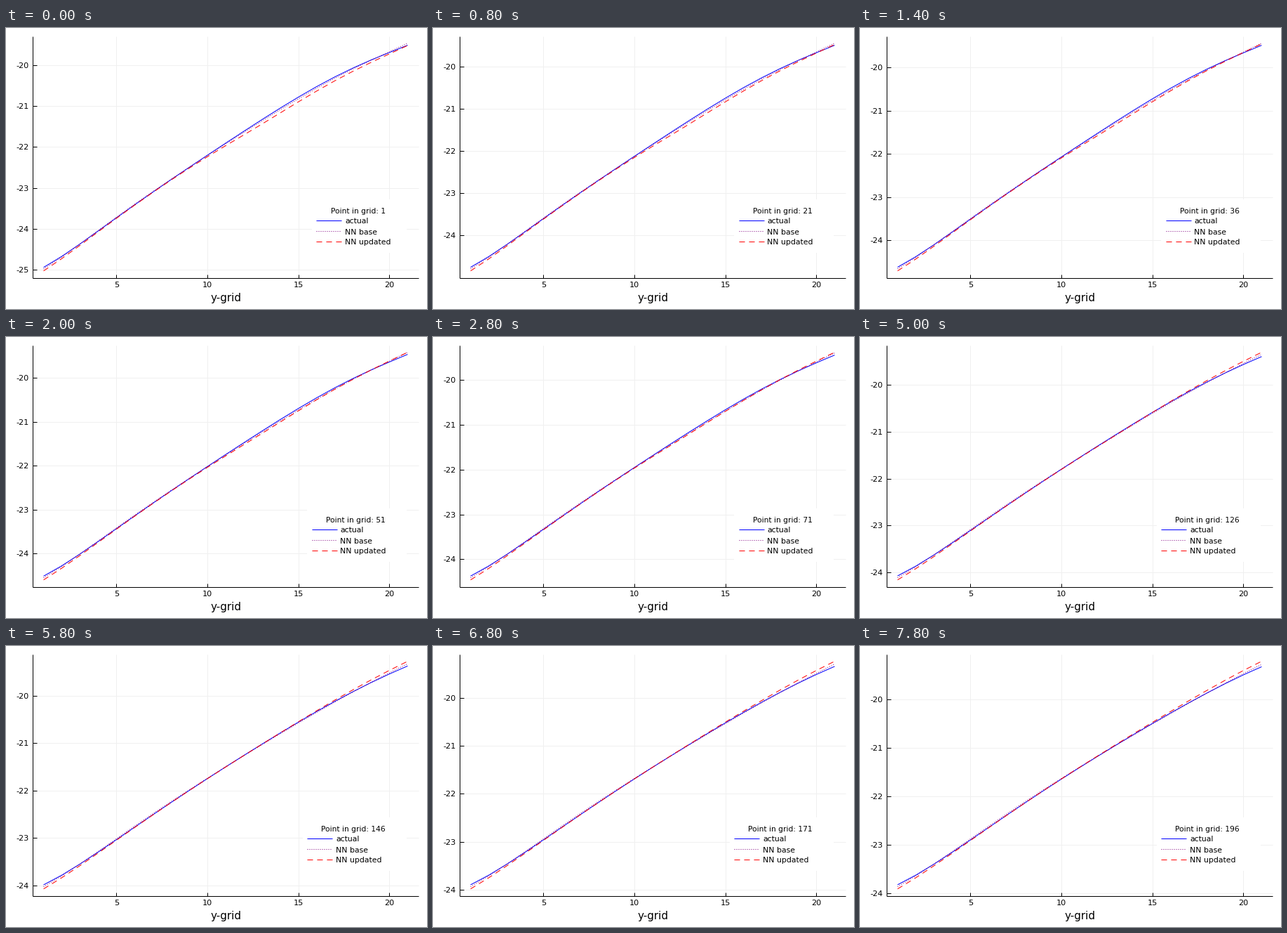
A matplotlib script for the animation above (8 s loop, 600x400 px).

```python
import numpy as np
import matplotlib.pyplot as plt
from matplotlib.animation import FuncAnimation
from matplotlib.patches import Rectangle
from numpy.polynomial.polynomial import polyval

W, H, DPI = 600, 400, 100
FRAMES, INTERVAL = 40, 200
LEFT, RIGHT, TOP, BOTTOM = 38, 588, 12, 355.5
PX = 72 / DPI
GRID = "#f0f0f0"
DASHED, DOTTED = (0, (8, 6)), (0, (1, 2))

X = np.arange(1, 22)
U = (X - 11) / 10  # grid mapped to -1..1

# Polynomial coefficients in U of the first and last "actual" curve
FIRST = [-21.908, 2.92, -0.14, -0.12, -0.52, -0.09, 0.34]
LAST = [-21.400, 2.36, -0.23, 0.06, 0.00, -0.17, 0.06]


def ease(p, rate):
    """Exponential approach from 0 to 1."""
    return np.expm1(-rate * p) / np.expm1(-rate)


def curves(p):
    # The left end settles early, the right end moves almost evenly.
    s = ease(p, 0.62 - 0.6 * U)
    actual = (1 - s) * polyval(U, FIRST) + s * polyval(U, LAST)

    wave = 0.13 * (U + 0.8) * (U + 0.2) * (U - 0.83)
    base = actual + wave + 0.025 * p * (1 - U ** 2) * (1 + U)

    ends = 0.113 * ((1 + U) / 2) ** 4.5 - 0.086 * ((1 - U) / 2) ** 9
    sag = (0.165 - 0.045 * U) / (1 + np.exp(-8 * (U - 0.05)))
    updated = actual + ends - sag * (1 - ease(p, 1.9))
    return actual, base, updated


def x_px(x):
    return LEFT + (x - 0.4) / 21.2 * (RIGHT - LEFT)


fig = plt.figure(figsize=(W / DPI, H / DPI), dpi=DPI, facecolor="white")
ax = fig.add_axes([0, 0, 1, 1])
ax.set_xlim(0, W)
ax.set_ylim(H, 0)
ax.axis("off")


def stroke(xs, ys, color="black", style="-", z=2):
    return ax.plot(xs, ys, color=color, lw=PX, ls=style, zorder=z,
                   solid_capstyle="butt", dash_capstyle="butt")[0]


def label(x, y, text, size, ha="left"):
    return ax.text(x, y, text, fontsize=size * PX, family="DejaVu Sans",
                   ha=ha, va="baseline", color="black", zorder=6)


# Fixed axes
stroke([LEFT, LEFT], [TOP, BOTTOM], z=4)
stroke([LEFT, RIGHT], [BOTTOM, BOTTOM], z=4)
for x in (5, 10, 15, 20):
    p = x_px(x)
    stroke([p, p], [TOP, BOTTOM], GRID, z=1)
    stroke([p, p], [BOTTOM - 5, BOTTOM], z=4)
    label(p, 369, str(x), 11.3, "center")
label(313.5, 388.7, "y-grid", 15.1, "center")

y_ticks = [(v, stroke([LEFT, RIGHT], [0, 0], GRID, z=1),
            stroke([LEFT, LEFT + 6], [0, 0], z=4),
            label(32.5, 0, str(v), 11.3, "right"))
           for v in range(-26, -18)]

STYLES = [("actual", "blue", "-"),
          ("NN base", "purple", DOTTED),
          ("NN updated", "red", DASHED)]
lines = [stroke([], [], color, style, 3) for _, color, style in STYLES]

# Legend
box = ax.add_patch(Rectangle((0, 244), 1, 76, fc="white", ec="none", zorder=5))
title = label(540.8, 263.5, "", 10.6, "right")
entries = []
for row, (name, color, style) in enumerate(STYLES):
    y = 274 + 15 * row
    entries.append((stroke([0, 36], [y, y], color, style, 6),
                    label(0, y + 4.5, name, 10.9)))


def draw(i):
    data = curves(i / (FRAMES - 1))
    low, high = np.min(data), np.max(data)
    pad = 0.03 * (high - low)
    low, high = low - pad, high + pad

    def y_px(v):
        return BOTTOM - (v - low) / (high - low) * (BOTTOM - TOP)

    for line, values in zip(lines, data):
        line.set_data(x_px(X), y_px(values))
    for v, grid, tick, text in y_ticks:
        y = y_px(v)
        for part in (grid, tick, text):
            part.set_visible(low <= v <= high)
        grid.set_ydata([y, y])
        tick.set_ydata([y, y])
        text.set_y(y + 4)

    point = str(1 + 5 * i)
    title.set_text("Point in grid: " + point)
    start = 448.6 - 6.5 * len(point)
    box.set_x(start - 6.5)
    box.set_width(570.5 - start + 6.5)
    for sample, text in entries:
        sample.set_xdata([start, start + 36])
        text.set_x(start + 40.8)
    return []


anim = FuncAnimation(fig, draw, frames=FRAMES, interval=INTERVAL,
                     init_func=lambda: draw(0), repeat=True, repeat_delay=0)
plt.show()
```
